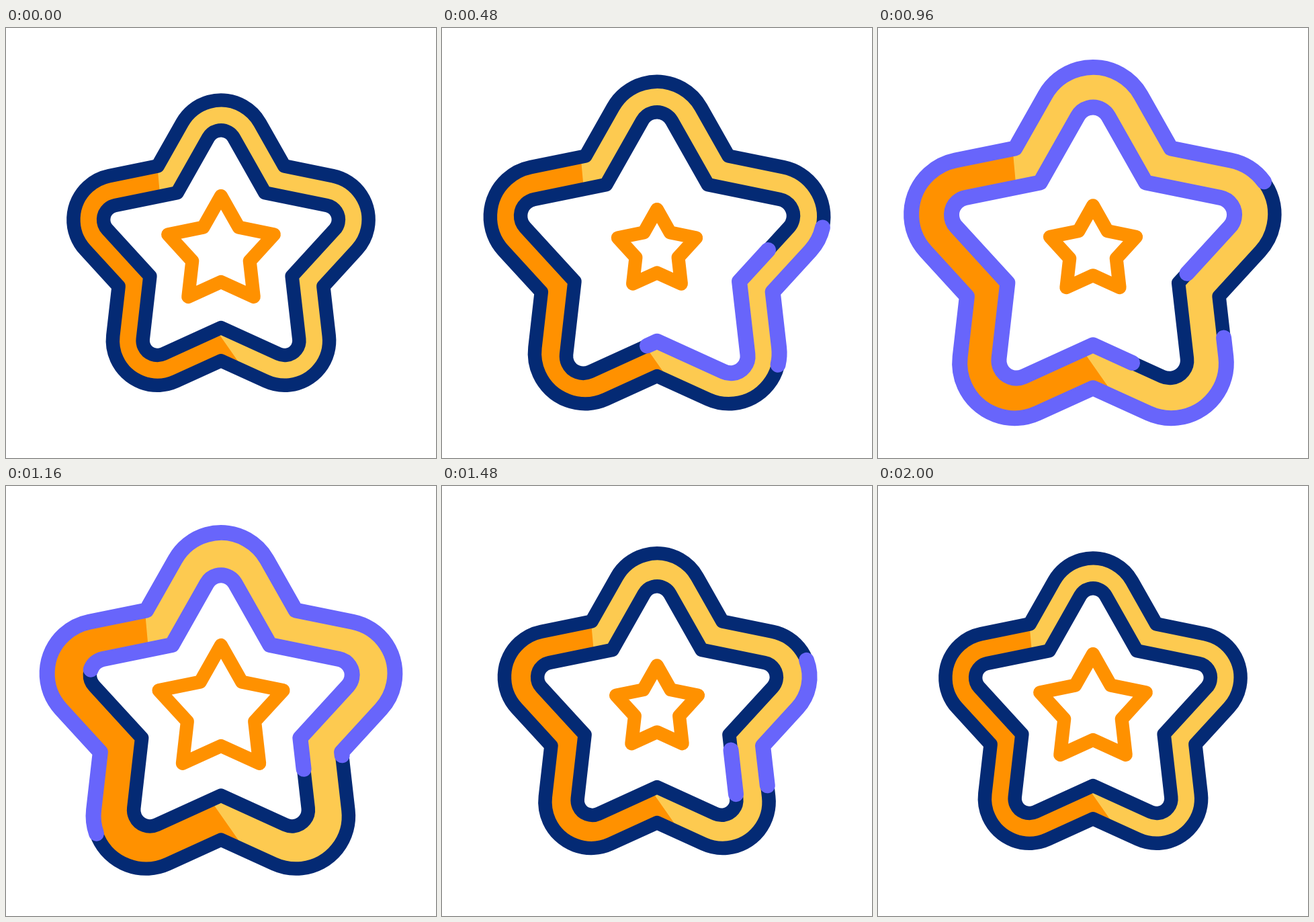
Recreate the animation shown at these times as an HTML page with a canvas. Size 640 by 640 pixels, loop 2240 ms.

```html
<!DOCTYPE html>
<html lang="en">
<head>
<meta charset="utf-8">
<title>Star</title>
<style>
html, body { margin: 0; width: 100%; height: 100%; overflow: hidden; background: #fff; }
canvas { display: block; width: 640px; height: 640px; }
</style>
</head>
<body>
<canvas width="640" height="640"></canvas>
<script>
const ctx = document.querySelector('canvas').getContext('2d');
const NAVY = '#042a74', VIOLET = '#6865fb', YELLOW = '#fdca50', ORANGE = '#ff9100';
const { PI, sin, cos, sqrt, min, max, floor } = Math;
const LOOP = 2240, STEP = 40, LEAD = 5;
const HALF = 29.5 * PI / 180; // half the angle of a star tip

// Keys are [step, value]; speed is zero at both ends and at turning points.
const GROW_OUT = [[2, 0], [7, .13], [11, .2004], [14, .2245], [17, .233], [19, .231],
  [24, .1787], [28, .093], [32, .034], [37, .008], [42, .001], [45, 0]];
const GROW_IN = [[0, 0], [7, .1605], [11, .199], [15, .211], [19, .204],
  [24, .116], [28, .05], [32, .017], [38, .003], [43, 0]];
const PULSE = [[0, 1], [6.5, .725], [12, 1.27], [18.5, .805], [24.5, 1.18], [31.5, .77], [38, 1]];
const SHADE = [[0, 0], [6, 13], [11, 9], [19, 5.5], [24, 3], [32, .4], [38, 0]];

const smooth = (n, start, length) => {
  const u = min(1, max(0, (n - start) / length));
  return u * u * (3 - 2 * u);
};

function track(keys, n) {
  const last = keys.length - 1;
  if (n <= keys[0][0]) return keys[0][1];
  if (n >= keys[last][0]) return keys[last][1];
  const rise = i => (keys[i + 1][1] - keys[i][1]) / (keys[i + 1][0] - keys[i][0]);
  const slope = i => {
    if (i === 0 || i === last) return 0;
    const a = rise(i - 1), b = rise(i);
    return a * b > 0 ? 2 * a * b / (a + b) : 0;
  };
  const i = keys.findIndex(k => k[0] > n) - 1;
  const [t0, v0] = keys[i], [t1, v1] = keys[i + 1];
  const h = t1 - t0, u = (n - t0) / h, w = 1 - u;
  return v0 * w * w * (1 + 2 * u) + v1 * u * u * (1 + 2 * w)
    + h * u * w * (w * slope(i) - u * slope(i + 1));
}

// Star with tips of radius r centred at distance d; starts at the lower right notch.
function star(cy, d, r) {
  const notch = (r + d * sin(HALF)) / sin(PI / 5 + HALF);
  const side = (d + r * sin(HALF) - notch * cos(PI / 5)) / cos(HALF);
  const bend = PI / 2 - HALF;
  const path = new Path2D();
  for (let i = 0; i < 5; i++) {
    const a = (18 + 72 * i) * PI / 180, tip = a + PI / 5;
    path.lineTo(320 + notch * cos(a), cy + notch * sin(a));
    const x = 320 + d * cos(tip), y = cy + d * sin(tip);
    if (r) path.arc(x, y, r, tip - bend, tip + bend);
    else path.lineTo(x, y);
  }
  path.closePath();
  return { path, length: 5 * (2 * side + 2 * r * bend) };
}

function stroke(path, color, width) {
  ctx.strokeStyle = color;
  ctx.lineWidth = width;
  ctx.stroke(path);
}

function fill(path, color) {
  ctx.fillStyle = color;
  ctx.fill(path);
}

function outline({ path, length }, from, to, shift) {
  stroke(path, NAVY, 20.5);
  if (to <= from) return;
  const dash = (to - from) * length;
  ctx.setLineDash([dash, length - dash]);
  ctx.lineDashOffset = -((from + shift + 1) % 1) * length;
  stroke(path, VIOLET, 23);
  ctx.setLineDash([]);
}

function shade(scale, shift) {
  const points = [[-300, -134], [-96.5 - shift * .45, -134], [-90 - shift * .45, -62],
    [-9 - shift, 127], [40 - shift, 197], [40 - shift, 300], [-300, 300]];
  const path = new Path2D();
  for (const [x, y] of points) path.lineTo(320 + x * scale, 320 + y * scale);
  fill(path, ORANGE);
}

function draw(n) {
  const so = 1 + track(GROW_OUT, n), si = 1 + track(GROW_IN, n), sp = track(PULSE, n);
  const outer = star(320 + 15 * so, 161 * so, 66.5 * so);
  const inner = star(320 + 15 * si, 161 * si, 21.75 * si);
  ctx.clearRect(0, 0, 640, 640);
  ctx.lineJoin = ctx.lineCap = 'round';

  ctx.save();
  ctx.clip(outer.path);
  fill(outer.path, YELLOW);
  shade(so, track(SHADE, n));
  ctx.restore();
  fill(inner.path, '#fff');

  outline(outer, smooth(n, 16, 21), smooth(n, 2, 21), -.1085 + .00464 * n);
  outline(inner, smooth(n, 14, 21), smooth(n, 0, 21), -.082 + .0049 * n);
  stroke(star(326 + 7 * sp, 83 * sp, 0).path, ORANGE, 20);
}

const begin = performance.now();
function tick() {
  const t = (performance.now() - begin) % LOOP;
  draw(max(0, floor(t / STEP) - LEAD));
  requestAnimationFrame(tick);
}
tick();
</script>
</body>
</html>
```
